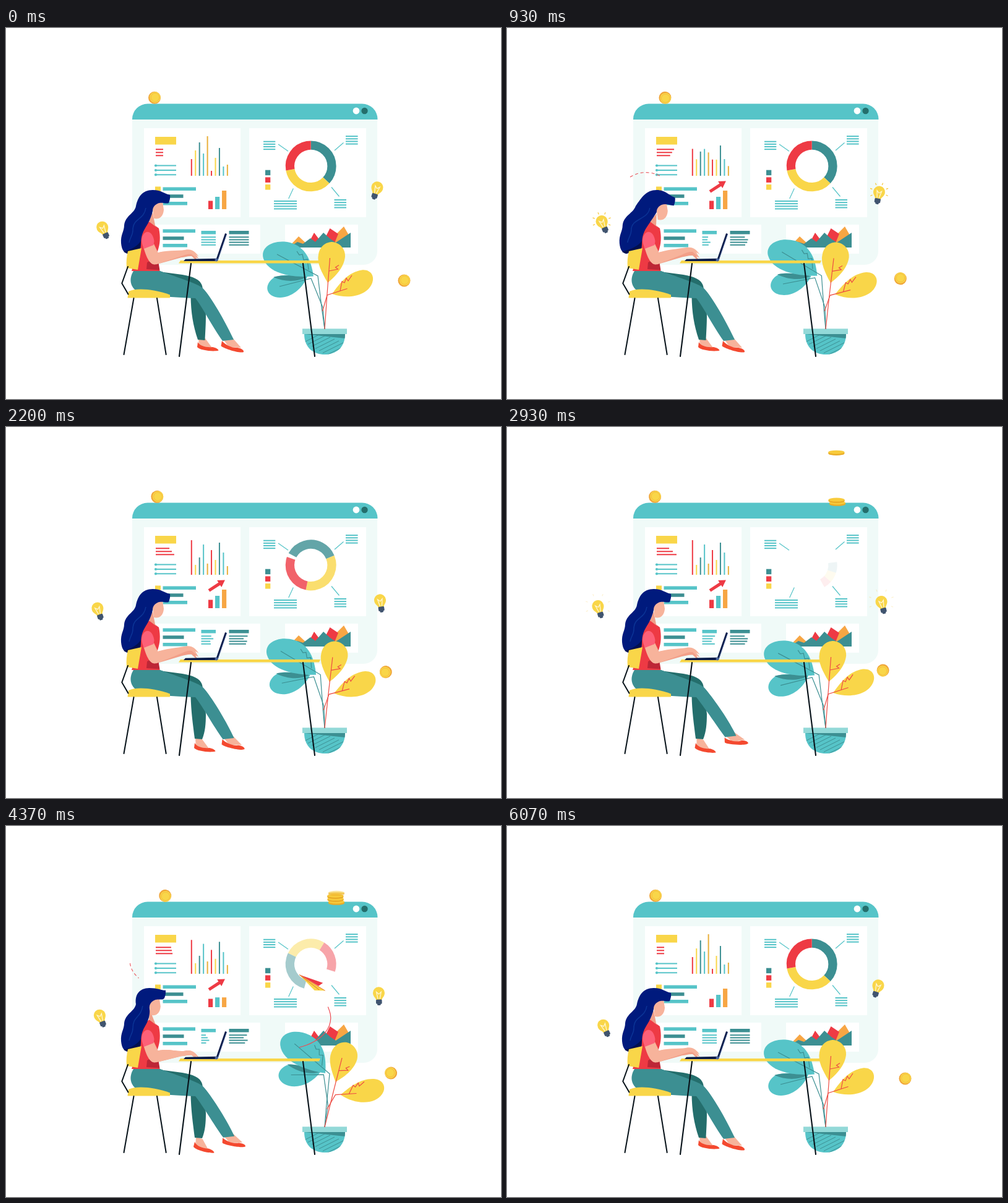
Recreate the animation shown at these times as an HTML page with a canvas. Size 800 px wide and 600 px high, loop 6110 ms.

```html
<!DOCTYPE html>
<html lang="en">
<head>
<meta charset="utf-8">
<title>Dashboard desk</title>
<style>
html, body { margin: 0; width: 100%; height: 100%; overflow: hidden; background: #fff; }
canvas { display: block; width: 800px; height: 600px; }
</style>
</head>
<body>
<canvas id="stage" width="800" height="600"></canvas>
<script>
const g = document.getElementById('stage').getContext('2d');
const LOOP = 6110, END = 6070, TAU = Math.PI * 2;
const TEAL = '#56c4c8', MID = '#3c8f92', DARK = '#246e6c', RED = '#ee3a44',
  YELLOW = '#f9d649', GOLD = '#f7a644', SKIN = '#f7b39b', NAVY = '#001a7d';
let now = 0;

// motion rules
const clamp = v => Math.max(0, Math.min(1, v));
const mix = (a, b, p) => a + (b - a) * p;
const wave = (cycles, phase = 0) => Math.cos(TAU * cycles * now / END + phase);
const bump = (peak, reach) => .5 + .5 * Math.cos(Math.PI * Math.min(1, Math.abs(now - peak) / reach));
function ramp(from, to) {
  const p = clamp((now - from) / (to - from));
  return p * p * (3 - 2 * p);
}

function rect(x, y, x2, y2, color) {
  g.fillStyle = color;
  g.fillRect(x, y, x2 - x, y2 - y);
}
function round(x, y, w, h, r, color) {
  g.fillStyle = color;
  g.beginPath();
  g.roundRect(x, y, w, h, r);
  g.fill();
}
function disc(x, y, r, color, ry = r) {
  g.fillStyle = color;
  g.beginPath();
  g.ellipse(x, y, r, ry, 0, 0, TAU);
  g.fill();
}
function arc(x, y, r, from, to, color, w) {
  g.strokeStyle = color;
  g.lineWidth = w;
  g.beginPath();
  g.arc(x, y, r, from, to);
  g.stroke();
}
function shape(d, color) {
  g.fillStyle = color;
  g.fill(new Path2D(d));
}
function line(d, color, w = 1) {
  g.strokeStyle = color;
  g.lineWidth = w;
  g.stroke(new Path2D(d));
}
function around(x, y, a, draw) {
  g.save();
  g.translate(x, y);
  g.rotate(a);
  draw();
  g.restore();
}
function rows(x, y, count, step, color, length) {
  for (let i = 0; i < count; i++) rect(x, y + i * step - 1, x + length(i), y + i * step + 1, color);
}
function bars(x, y, widths, color) {
  widths.forEach((w, i) => rect(x, y + i * 11.75, x + w, y + i * 11.75 + 5.5, color[i]));
}

function frameWindow() {
  round(204, 140, 396, 243, [0, 0, 22, 22], '#f0faf8');
  round(204, 122.5, 396.5, 25.5, [25, 25, 0, 0], TEAL);
  disc(566, 134, 5.4, '#fff');
  disc(579.5, 134, 5.2, DARK);
  rect(223, 162, 379, 306, '#fff');
  rect(393, 162, 582, 306, '#fff');
  rect(223, 318, 411, 365, '#fff');
  rect(451, 318, 569, 365, '#fff');
}

const FIRST = [27, 41, 54, 36, 64, 8, 29, 45, 15, 18];
const SETTLED = [56, 16, 28, 49, 18, 40, 24, 52, 36, 14];

function leftPanels() {
  const fresh = ((1 + wave(1)) / 2) ** 3.5;
  rect(241, 176, 275, 188.5, YELLOW);
  rows(242, 196.3, 3, 5, RED, i => mix(26 + (1 - i) * 6 * wave(1), 12, fresh ** 3));
  [222.5, 230, 237.3].forEach(y => {
    rect(242, y - 1, 275, y + 1, TEAL);
    disc(242, y, 2.1, TEAL);
  });
  const colors = [RED, YELLOW, MID, TEAL, '#e9b03a'];
  SETTLED.forEach((h, i) => {
    const x = 299.8 + i * 6.45;
    rect(x - 1, 239 - mix(h, FIRST[i], fresh), x + 1, 239, colors[i % 5]);
  });

  const three = [TEAL, MID, TEAL];
  rect(241, 256.5, 250, 265, YELLOW);
  bars(253.5, 257.5, [53.5, 33, 39.5], three);
  const growth = Math.max(32 * (1 - ramp(3000, 3600)), (now - 3500) / 55);
  [RED, TEAL, GOLD].forEach((color, i) =>
    rect(327 + i * 11, 293 - Math.min(growth, [13.5, 20, 30][i]), 334.2 + i * 11, 293, color));
  const show = ramp(100, 850) * (1 - .6 * bump(3600, 400)) * (1 - ramp(4850, 5850));
  g.globalAlpha = show;
  around(328, 264.5, -.58, () => {
    g.scale(.5 + show / 2, .5 + show / 2);
    shape('M0-2.5H20V-6.5L31 0 20 6.5V2.5H0Z', RED);
  });
  g.globalAlpha = 1;

  bars(253.5, 325.5, [52.5, 34, 39.5], three);
  rect(315.5, 328, 339, 333.5, TEAL);
  rows(315.5, 338.2, 4, 4.2, TEAL, i => mix(10 + 8 * bump(2700, 1900) + 3 * wave(2, i * 2), 23.5, fresh ** 4));
  rect(360.5, 328, 392.5, 333.5, MID);
  rows(360.5, 338.2, 4, 4.2, MID, i => mix(27 + 3.5 * wave(3, i * 2.4), 32, fresh ** 4));
}

function donut() {
  const gone = now < 3800 ? ramp(1800, 3180) : (1 - clamp((now - 3800) / 1700)) ** 1.5;
  const sweep = TAU * (1 - gone ** 2.3);
  if (gone >= 1) return;
  let a = -TAU / 4 - gone * 5.3;
  g.globalAlpha = 1 - gone;
  [[MID, .369], [YELLOW, .353], [RED, .278]].forEach(([color, part]) =>
    arc(492.7, 223.4, 33.8, a, a += sweep * part, color, 14.3));
  g.globalAlpha = 1;
}
function rightPanels() {
  donut();
  [MID, RED, YELLOW].forEach((c, i) => rect(419, 229.7 + i * 11.7, 427.3, 238.2 + i * 11.7, c));
  [[416, 19.3, 183.7], [549, 19.6, 175.1], [433, 37, 280], [530.5, 19.5, 278]].forEach(([x, w, y]) =>
    rows(x, y, 4, 4.15, TEAL, () => w));
  line('M440 188L456 199.3M545.5 185.5L531 198M464.3 259.5L456.7 276M526 257.5L538.5 272.5', TEAL, 1.2);
  shape('M457 354L473 337 487 350H503L512 337 522 345 546 321 557 340V354Z', GOLD);
  shape('M490 346L498 331 507 343 517 337 523.5 324 537 333 530 350Z', RED);
  shape('M457 355L471 346 480 349 492 340 500 346 513 331 524 341 533 347 557 331V355Z', MID);
}

function coin(x, y, a) {
  around(x, y, a, () => {
    disc(0, 0, 10, '#f0a63a');
    disc(.9, -.7, 8.8, YELLOW);
    arc(.9, -.7, 6.8, 0, TAU, '#f5b93d', .9);
  });
}
function coins() {
  const roll = -9.4 * wave(2, .56), drift = wave(1);
  coin(248 + roll, 112.8, .8 + roll / 10);
  coin(625.5 + 18 * drift, 401 + 7.5 * drift, 1.8 * drift - 1.8);
  for (let i = 0; i < 4; i++) {
    const p = (now - 2405 - i * 165) / 300;
    if (p < 0) continue;
    const y = mix(-12, 122.5 - i * 4.9, Math.min(1, p) ** 2), x = 533 + wave(0, i * 2);
    g.globalAlpha = 1 - ramp(4240 + (3 - i) * 120, 4500 + (3 - i) * 120);
    disc(x, y + 2.2, 13, '#e9ac27', 3.1);
    rect(x - 13, y, x + 13, y + 2.2, '#e9ac27');
    disc(x, y, 13, '#f8cb3c', 3);
  }
  g.globalAlpha = 1;
}

function bulb(x, y, tilt) {
  around(x, y, tilt, () => {
    shape('M-4.5 11.5C-5 8-9.5 6-9.5 0A9.5 9.5 0 0 1 9.5 0C9.5 6 5 8 4.5 11.5Z', YELLOW);
    line('M-1.5 10L-3.8-1.5 0 2 3.8-1.5 1.5 10', '#fff6d2', 1.3);
    round(-4.8, 10.7, 9.6, 7.2, 1.5, '#40546f');
    round(-2.8, 17, 5.6, 3.2, 1.4, '#40546f');
  });
  const p = (now * 14 / END + .915) % 1, r = 11.5 + 9 * p;
  g.globalAlpha = clamp((.72 - p) * 5);
  for (let i = 0; i < 6; i++) around(x, y, (i - 2.5) * .8, () => line(`M0 ${-r}V${-r - 3.5}`, '#f5c63c', 1.2));
  g.globalAlpha = 1;
}
function bulbs() {
  const rise = wave(1, .2);
  bulb(151.3 + 4.4 * rise, 306 + 16.5 * rise, -.37 - .06 * rise);
  bulb(602.5 - 2.5 * rise, 270 - 12.5 * rise, .03 + .28 * wave(1));
}

function branch(a, draw) {
  around(515, 487, a, () => { g.translate(-515, -487); draw(); });
}
function plant() {
  rect(479, 486.3, 551, 495, '#93d9d8');
  const bowl = 'M482 495C482 518 498 528 515 528S548 518 548 495Z';
  shape(bowl, TEAL);
  g.save();
  g.clip(new Path2D(bowl));
  shape('M482 495H548L548 502Z', MID);
  for (let i = 0; i < 8; i++) line(`M${482 + i * 6} ${508 + i * 3.5}L${510 + i * 7} ${494 + i * 3}`, MID, 1);
  g.restore();

  const sway = .08 * bump(1550, 1500) + .22 * bump(4370, 600) - .075 * bump(5250, 500);
  branch(sway * 1.1, () => {
    shape('M487 402C478 425 455 440 435 435C416 429 420 410 436 402C455 397 475 402 487 402Z', TEAL);
    shape('M432 403C445 399 470 400 486 402.5C472 411 450 411 432 403Z', MID);
    line('M442 418L493 405 512 452 515 487', MID, 1.2);
  });
  branch(sway, () => {
    shape('M497 401.5C470 404 425 400 416 373C410 354 433 341 459 347C484 354 493 375 497 401.5Z', TEAL);
    line('M438 366L504 401 510.5 455 515 487M470 361L474 367 479 366 481 375 487 374 489 391', MID, 1.2);
  });
  branch(sway * .78, () => {
    shape('M520 412C510 395 502 380 505 366C508 350 520 346 527 346C540 347 549 358 548 370C546 388 532 402 520 412Z', YELLOW);
    line('M523.5 372L519 430 515 487M522 393L536.5 390 532.5 387 538 383.5', '#ee4b43', 1.2);
  });
  branch(sway * 1.13, () => {
    shape('M527 430C540 412 553 395 575 391.5C590 390 596 402 592 412C585 432 555 440 527 430Z', YELLOW);
    line('M551.5 421.5L519 432 511.5 458M540 425L543 410 547 412 550 404.5 553 409 559 400', '#ee4b43', 1.2);
  });
}

function forearm(dy, color) {
  const y = v => v + dy;
  shape(`M240 365C258 358 276 ${y(357)} 290 ${y(354.5)}C299 ${y(352.5)} 306 ${y(357)} 311.5 ${y(365.5)}` +
    `L306 ${y(362.5)} 309 ${y(368)} 306 ${y(367)} 300 ${y(361.5)}C294 ${y(361)} 289 ${y(363)} 283 ${366 + dy * .7}` +
    `L244 382C235 384 230 376 230 370Z`, color);
}
function foot(x, y, dx, dy, a, skin, shoe) {
  around(x + dx, y + dy, a, () => {
    g.translate(-x, -y);
    shape(skin, SKIN);
    shape(shoe, '#f4492f');
  });
}

function legs() {
  const step = ramp(1100, 2200) * (1 - ramp(4400, 5100)), tap = bump(3400, 1700);
  const bx = -5 * step, fx = 3 * tap, fy = -5.5 * tap;
  foot(312, 508, bx, 3 * step, .13 * ramp(2300, 3600) * step,
    'M311 500L322 502 333 517 312 515Z',
    'M310 508C313 514 323 517 334 516C339 517 343 519 343.5 521.5C335 524 312 521 309 516Z');
  foot(352, 506, fx, fy, -.28 * tap,
    'M350 502L366 501 380 517 360 516Z',
    'M349 506C354 512 365 518 374 517C380 518 385 521 384 524C379 527 350 518 347.5 514Z');
  shape(`M240 393L285 399C306 403 318 408 318 424L323 464C323 480 322 493 ${321.5 + bx * .9} 505` +
    `L${310 + bx} 504C302 480 299 460 298.5 434Z`, DARK);
  shape(`M206 393C198 406 201 419 212 426C236 433 270 436 306 437C318 452 ${334 + fx} ${484 + fy} ${350 + fx} ${506 + fy}` +
    `L${368 + fx} ${504 + fy}C${357 + fx} ${480 + fy} 336 442 321 424C315 414 280 405 247 392Z`, MID);
}

function head(nod) {
  const X = v => v + nod * .8, Y = v => v + nod * .35, q = -.7 * Math.max(nod, 0);
  shape(`M${X(237)} ${Y(298)}L241 319 243 322 231 313Z`, '#f09f88');
  shape(`M${X(236)} ${Y(286)}L${X(253)} ${Y(281)} ${X(255)} ${Y(294)}C${X(254)} ${Y(306)} ${X(247)} ${Y(310)} ${X(239)} ${Y(308)}Z`, SKIN);
  const tip = 265 + nod * 1.1, ty = 270 + nod * .7;
  shape(`M${tip} ${ty}C${X(257)} ${Y(269)} ${X(252)} 262 ${X(237)} 262C${X(220)} 262 ${X(213)} 274 ${210 + q * .5} 288` +
    `C${208 + q} 300 ${193 + q} 303 ${191 + q} 319C${191 + q} 329 ${185 + q} 334 ${186 + q} 348` +
    `C${187 + q} 359 ${191 + q} 364 ${197 + q} 365L217 357C219 347 217 340 222 329C226 321 234 311 ${X(237)} ${Y(296)}` +
    `C${X(237)} ${Y(289)} ${X(241)} ${Y(286)} ${X(245)} ${Y(284)}C${X(252)} ${Y(281)} ${X(258)} ${Y(285)} ${tip - 2} ${ty + 13}` +
    `C${tip} ${ty + 8} ${tip + .5} ${ty + 4} ${tip} ${ty}Z`, NAVY);
  shape(`M${190 + q} 362C${202 + q} 358 212 354 218 344L217 358 ${197 + q} 365Z`, '#00104f');
  line(`M${X(226)} 291C${X(223)} 311 ${205 + q} 307 ${205 + q} 327C${205 + q} 336 ${200 + q} 339 ${199 + q} 347`, '#0b3496', 1.5);
}

function woman() {
  legs();
  shape('M196.5 436.5L198 426C211 420 238 422 265 431.5V436.5Z', YELLOW);
  const press = 4.5 - 4.5 * wave(24, 1.5);
  forearm(mix(press, 9, .7), '#f29f88');
  shape('M232 313L247 324C250 338 249 350 245 361L242 371 248.5 393H203L212 360C215 335 222 318 232 313Z', RED);
  shape('M228 379L245 371 248.5 391.5 227 390Z', '#bd2636');
  head(6 * bump(930, 700) + 6 * bump(3670, 500) - 6.5 * bump(4400, 500));
  shape('M197 361L219 356 213 391 195 388C194 378 195 369 197 361Z', YELLOW);
  shape('M222 354L239 349 246 364 252 379 240 382.5C231 382 226 368 222 354Z', SKIN);
  forearm(press, SKIN);
  shape('M222 334C228 325 238 331 239.5 345L238.5 351 223 357C218 346 218 340 222 334Z', '#fd6078');
}

function furniture() {
  g.lineCap = 'round';
  line('M206.5 437L190.5 528M244 437L258.7 528M197 386L187.3 413 197.5 430.5', '#08131a', 2);
  shape('M282 376H508L506 380.5H279Z', YELLOW);
  line('M299 381L280 531M480 381L499 531', '#08131a', 2.1);
  g.lineCap = 'butt';
  shape('M290 373.7L341 372.8 341 377 287 377Z', '#0b1c49');
  line('M340.5 376L355.5 332.5', '#0b1c49', 3);
  line('M342 376L356.7 333', '#4b649a', .8);
  disc(340, 375, 2.5, '#4a659c');
}

function route(d) {
  const path = document.createElementNS('http://www.w3.org/2000/svg', 'path');
  path.setAttribute('d', d);
  const size = path.getTotalLength();
  return p => path.getPointAtLength(size * p);
}
const approach = route('M200 222C215 300 340 372 474 358C520 346 532 316 521 295C516 275 512 260 495 252');
const leave = route('M495 252C468 240 440 215 455 180C470 145 530 160 575 215C640 290 715 347 787 336L937 314');

function flight(t) {
  const u = (t - 4370) / 760;
  return u < 0 ? approach(clamp(1 + u)) : leave(Math.min(1, .77 * u ** 1.25));
}
function dashes(d, from, to) {
  if (now < from || now > to) return;
  g.globalAlpha = clamp(Math.min(now - from, to - now) / 60);
  g.setLineDash([5, 4]);
  line(d, '#e8545a', 1.1);
  g.setLineDash([]);
  g.globalAlpha = 1;
}
function plane() {
  dashes('M199 241Q222 227 248 239.5', 780, 1100);
  dashes('M200.5 222Q202 235 214.5 246', 4080, 4480);
  if (now < 3900 || now > 5330) return;
  if (now < 4600) {
    let trail = '';
    for (let k = 230; k >= 80; k -= 10) {
      const p = flight(now - k);
      trail += `${trail ? 'L' : 'M'}${p.x} ${p.y}`;
    }
    line(trail, '#ee4b53', 1.2);
  }
  const at = flight(now), a = flight(now - 12), b = flight(now + 12);
  g.globalAlpha = clamp((now - 3900) / 80);
  around(at.x, at.y, Math.atan2(b.y - a.y, b.x - a.x), () => {
    shape('M24 0L-16 6.7-12-1Z', RED);
    shape('M24 0L-25-2.5-10-10.5Z', YELLOW);
    line('M-25-2.5L24 0M-16-6L24 0', '#e8792f', .9);
  });
  g.globalAlpha = 1;
}

function draw(t) {
  now = Math.min(t % LOOP, END);
  rect(0, 0, 800, 600, '#fff');
  frameWindow();
  leftPanels();
  rightPanels();
  coins();
  bulbs();
  plant();
  woman();
  furniture();
  plane();
}

let begin;
function tick(t) {
  begin ??= t;
  draw(t - begin);
  requestAnimationFrame(tick);
}
draw(0);
requestAnimationFrame(tick);
</script>
</body>
</html>
```
